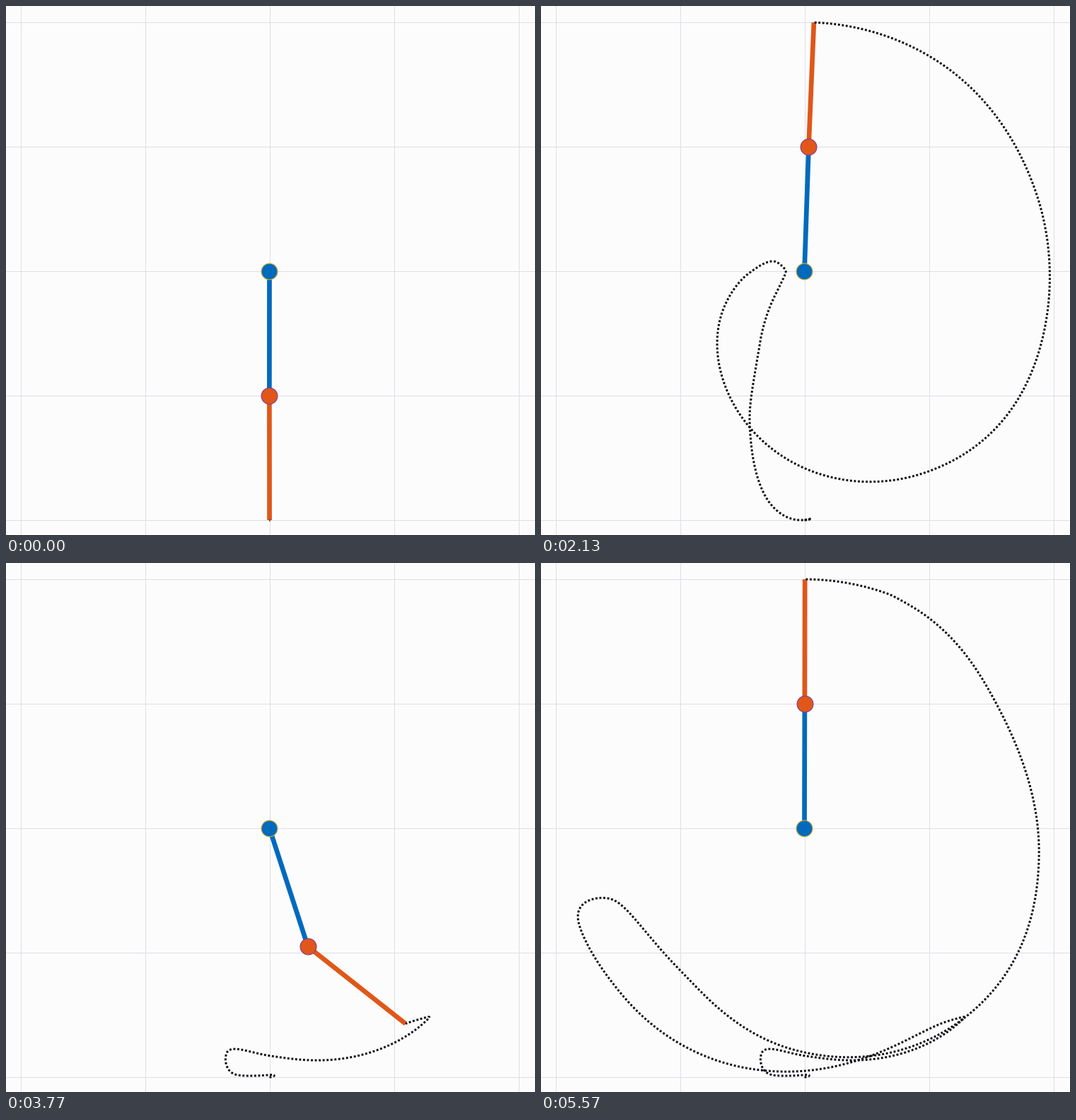
A matplotlib script for the animation above (5600 ms loop, 748x748 px).

```python
import numpy as np
import matplotlib.pyplot as plt
from matplotlib.animation import FuncAnimation

SIZE, DPI = 748, 187
PX = 72 / DPI                      # one pixel in points
PIVOT = np.array([372.5, 375.0])
LINK = 176.0
GRID = 176.1
SWING = 2800                       # ms per swing-up
STEP = 20                          # ms per drawn frame
TAU = 150                          # ms, settling time at the top
BLUE, ORANGE = "#006abd", "#e05719"

# Key poses: time in ms, then both link angles in degrees from straight down.
# After the last one the links settle upright.
FOLD_OVER = [
    (0, 0, 0), (220, -4.5, 7.3), (480, 10, -25.6), (640, 29.7, -69.3),
    (765, 38.4, -100.8), (875, 29.1, -134.7), (990, -2.1, -173.5),
    (1100, -25, -191.4), (1225, -11.2, -165.8), (1330, 3.7, -134.5),
    (1472, 29.3, -66.7), (1590, 50.7, 12.9), (1672, 64.5, 73.5),
    (1768, 98, 119.5), (1888, 147.5, 152.5), (2130, 178.05, 177.6),
]
PUMP = [
    (0, 0, 0), (200, -7.8, 7.2), (300, -6.9, -6.9), (430, 14, -35),
    (555, 24.2, -23.4), (820, 35, 39.2), (890, 33.5, 47), (970, 18, 51.7),
    (1169, -16.8, 4.4), (1254, -30.2, -30.2), (1312, -41.3, -56.3),
    (1370, -56.8, -78.4), (1437, -33.5, -104.5), (1506, -0.7, -82.1),
    (1588, 24.5, -29.1), (1676, 45, 36), (1775, 64.8, 101.6),
    (1863, 101, 147), (1930, 145, 162.2), (2000, 160, 163),
]


def angles(keys, t):
    """Smooth curve through the key poses, then exponential settling."""
    keys = np.array(keys, float)
    kt, q = keys[:, 0], keys[:, 1:]
    slope = np.gradient(q, kt, axis=0)
    slope[0], slope[-1] = 0, (180 - q[-1]) / TAU
    i = np.clip(np.searchsorted(kt, t, side="right") - 1, 0, len(kt) - 2)
    h = (kt[i + 1] - kt[i])[:, None]
    u = np.minimum((t - kt[i])[:, None] / h, 1)
    ease = u * u * (3 - 2 * u)
    curve = (q[i] * (1 - ease) + q[i + 1] * ease
             + h * slope[i] * u * (1 - u) ** 2
             - h * slope[i + 1] * u * u * (1 - u))
    late = np.maximum(t - kt[-1], 0)[:, None]
    return np.where(late > 0, 180 - (180 - q[-1]) * np.exp(-late / TAU), curve)


def solve(keys):
    """Elbow and tip positions for every 2 ms of a swing."""
    q = np.radians(angles(keys, np.arange(0, SWING, 2)))
    arm = LINK * np.stack([np.sin(q), np.cos(q)], axis=-1)
    elbow = PIVOT + arm[:, 0]
    return elbow, elbow + arm[:, 1]


swings = [solve(FOLD_OVER), solve(PUMP)]

fig = plt.figure(figsize=(SIZE / DPI, SIZE / DPI), dpi=DPI, facecolor="#fcfcfd")
ax = fig.add_axes([0, 0, 1, 1])
ax.set(xlim=(0, SIZE), ylim=(SIZE, 0))
ax.axis("off")

for n in range(-2, 3):
    ax.axvline(PIVOT[0] + 0.4 + n * GRID, color="#dfdfe4", lw=PX, zorder=0)
    ax.axhline(PIVOT[1] + 0.2 + n * GRID, color="#dfdfe4", lw=PX, zorder=0)


def link(color):
    return ax.plot([], [], color=color, lw=6.7 * PX, solid_capstyle="butt")[0]


def joint(face, edge):
    return ax.plot([], [], "o", ms=22.8 * PX, mfc=face, mec=edge, mew=1.2 * PX)[0]


upper, lower = link(BLUE), link(ORANGE)
hub, knee = joint(BLUE, "#c9a83a"), joint(ORANGE, "#8a3f86")
hub.set_data(*PIVOT[:, None])
trace, = ax.plot([], [], color="#0c0c10", lw=3 * PX, ls=(0, (0.95, 0.9)),
                 dash_capstyle="butt")


def draw(k):
    part, t = divmod(k * STEP + STEP // 2, SWING)
    elbow, tip = swings[part]
    i = t // 2
    upper.set_data(*np.array([PIVOT, elbow[i]]).T)
    lower.set_data(*np.array([elbow[i], tip[i]]).T)
    knee.set_data(*elbow[i][:, None])
    trace.set_data(*tip[:i + 1].T)
    return upper, lower, hub, knee, trace


anim = FuncAnimation(fig, draw, frames=2 * SWING // STEP, interval=STEP,
                     repeat=True, repeat_delay=0)
plt.show()
```
